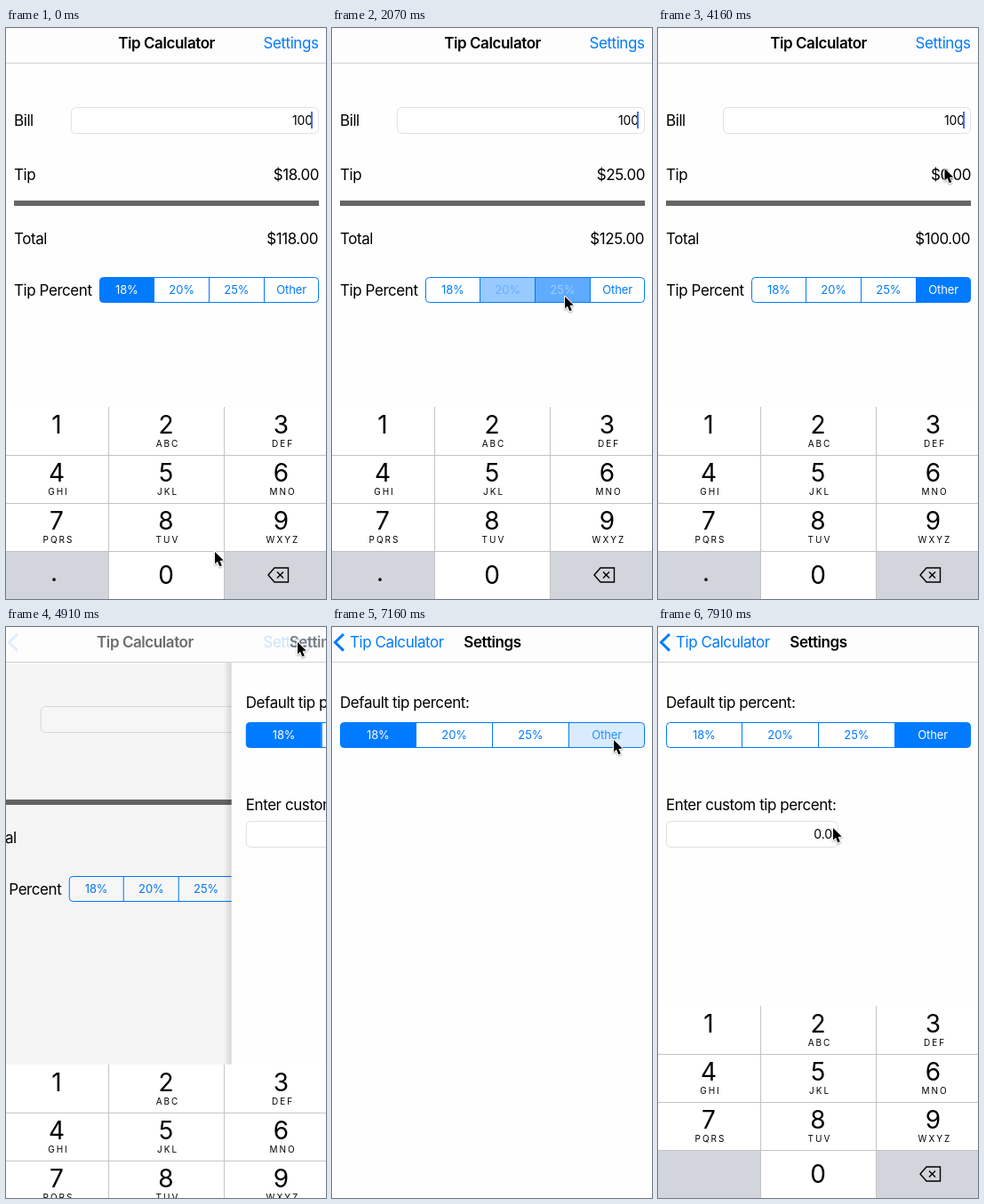
Recreate the animation shown at these times as an HTML page with a canvas. Size 360 px wide and 642 px high, loop 8 s.

```html
<!DOCTYPE html>
<html lang="en">
<head>
<meta charset="utf-8">
<title>Tip Calculator</title>
<style>
html, body { margin: 0; width: 100%; height: 100%; overflow: hidden; background: #fefefe; }
canvas { display: block; width: 360px; height: 642px; }
</style>
</head>
<body>
<canvas id="stage"></canvas>
<script>
const W = 360, H = 642, LOOP = 8000, TICK = 149.25;
const BLUE = '#007aff', PAPER = '#fefefe';
const canvas = document.getElementById('stage');
const ctx = canvas.getContext('2d');
const dpr = window.devicePixelRatio || 1;
canvas.width = W * dpr;
canvas.height = H * dpr;

// Pointer stops: tick, x, y
const STOPS = [
  [0, 235, 589], [7, 213, 302], [10, 213, 302], [13, 262, 302], [16, 262, 302],
  [18, 317, 299], [25, 317, 299], [31, 328, 17], [38, 328, 17], [39, 316, 151],
  [41, 317, 164], [44, 317, 127], [49, 317, 127], [53, 197, 226]
];
// Segment choices: tick pressed, tick of the cross-fade, chosen index
const BILL_PICKS = [[8, 9, 1], [13, 14, 2], [18, 20, 3]];
const DEFAULT_PICKS = [[48, 49, 3]];
const PUSH = 33, REVEAL = 49;

const clamp = v => Math.max(0, Math.min(1, v));

// Critically damped spring, sampled from the given start tick
function spring(n, start) {
  if (n < start) return 0;
  const x = 1.11 + 2.7 * (n - start);
  return 1 - Math.exp(-x) * (1 + x);
}

function pointerAt(n) {
  const i = STOPS.findIndex(s => s[0] > n);
  if (i < 0) return STOPS[STOPS.length - 1].slice(1);
  const [n0, x0, y0] = STOPS[i - 1], [n1, x1, y1] = STOPS[i];
  const u = (n - n0) / (n1 - n0), e = u * u * (3 - 2 * u);
  return [x0 + (x1 - x0) * e, y0 + (y1 - y0) * e];
}

// Amount of blue in each of the four segments
function levels(n, picks) {
  let a = [1, 0, 0, 0], current = 0;
  for (const [press, swap, to] of picks) {
    if (n > swap) {
      a = [0, 0, 0, 0];
      a[to] = 1;
      current = to;
    } else if (n === swap) {
      a[current] = 0.4;
      a[to] = 0.63;
    } else if (n >= press) {
      a[to] = 0.15;
    }
  }
  return a;
}

function caretAlpha(n) {
  const period = 1100, u = (n * TICK - 3650) / period;
  const gap = Math.abs(u - Math.round(u)) * period;
  return clamp((gap - 120) / 120);
}

function text(str, x, y, o = {}) {
  const { size = 17, weight = 400, align = 'left', color = '#000', alpha = 1 } = o;
  const gap = o.gap ?? (size === 17 ? -0.43 : -0.1);
  ctx.font = `${weight} ${size}px Inter, "Open Sans", sans-serif`;
  ctx.letterSpacing = gap + 'px';
  ctx.textAlign = align;
  ctx.fillStyle = color;
  ctx.globalAlpha = alpha;
  ctx.fillText(str, x, y);
  ctx.globalAlpha = 1;
}

function rect(x, y, w, h, color) {
  ctx.fillStyle = color;
  ctx.fillRect(x, y, w, h);
}

function line(points, color, width) {
  ctx.beginPath();
  points.forEach(p => ctx.lineTo(...p));
  ctx.strokeStyle = color;
  ctx.lineWidth = width;
  ctx.stroke();
}

function roundBox(x, y, w, h, r) {
  ctx.beginPath();
  ctx.roundRect(x + 0.5, y + 0.5, w - 1, h - 1, r);
}

function field(x, y, w, value) {
  roundBox(x, y, w, 30, 5);
  ctx.fillStyle = '#fff';
  ctx.fill();
  ctx.strokeStyle = '#e0e0e0';
  ctx.lineWidth = 1;
  ctx.stroke();
  text(value, x + w - 7, y + 19.5, { size: 14, align: 'right' });
}

function segments(x, y, w, amounts) {
  const h = 29, part = w / 4;
  ctx.save();
  roundBox(x, y, w, h, 4);
  ctx.clip();
  rect(x, y, w, h, '#fff');
  ['18%', '20%', '25%', 'Other'].forEach((label, i) => {
    const a = amounts[i], left = Math.floor(x + part * i);
    ctx.globalAlpha = a;
    rect(left, y, Math.floor(x + part * (i + 1)) - left, h, BLUE);
    ctx.globalAlpha = 1;
    if (i) rect(left, y, 1, h, BLUE);
    text(label, x + part * (i + 0.5), y + 19, {
      size: 13, align: 'center', color: `rgb(${255 * a},${122 + 133 * a},255)`
    });
  });
  ctx.restore();
  roundBox(x, y, w, h, 4);
  ctx.strokeStyle = BLUE;
  ctx.lineWidth = 1;
  ctx.stroke();
}

function billPage(n) {
  const tip = n < 9 ? 18 : n < 14 ? 20 : n < 19 ? 25 : 0;
  const money = v => '$' + v.toFixed(2);
  rect(-7, 0, 375, H, PAPER);
  text('Bill', 9, 110);
  field(73, 89, 279, '100');
  ctx.globalAlpha = caretAlpha(n);
  rect(343, 94, 2, 19, '#426bf2');
  ctx.globalAlpha = 1;
  text('Tip', 9, 171);
  text(money(tip), 352, 171, { align: 'right' });
  rect(9, 194, 343, 6, '#666');
  text('Total', 9, 243);
  text(money(100 + tip), 351, 243, { align: 'right' });
  text('Tip Percent', 9, 300.5);
  segments(105, 280, 247, levels(n, BILL_PICKS));
}

function settingsPage(n) {
  rect(-7, 0, 375, H, PAPER);
  text('Default tip percent:', 9, 91);
  segments(9, 107, 343, levels(n, DEFAULT_PICKS));
  if (n < PUSH + 3 || n >= REVEAL) {
    text('Enter custom tip percent:', 9, 205.5);
    field(9, 218, 194, '0.0');
  }
}

function pages(n, p) {
  ctx.save();
  ctx.translate(-112.5 * p, 0);
  billPage(n);
  ctx.restore();
  if (!p) return;
  const x = 375 * (1 - p);
  rect(0, 0, W, H, `rgba(0,0,0,${0.12 * p})`);
  const shade = ctx.createLinearGradient(x - 16, 0, x - 7, 0);
  shade.addColorStop(0, 'rgba(0,0,0,0)');
  shade.addColorStop(1, `rgba(0,0,0,${0.2 * (1 - p)})`);
  rect(x - 16, 0, 9, H, shade);
  ctx.save();
  ctx.translate(x, 0);
  settingsPage(n);
  ctx.restore();
}

function navBar(n, p) {
  rect(0, 0, W, 39, '#fdfdfd');
  rect(0, 39, W, 1, '#d2d2d2');
  const bold = { weight: 600, align: 'center' };
  text('Tip Calculator', 180.5 - 79 * p, 23, { ...bold, alpha: clamp(1 - 1.4 * p) });
  const dim = n === PUSH - 1 ? 0.3 : 1;
  text('Settings', 351.5, 23, {
    align: 'right', color: BLUE, alpha: p ? clamp(0.35 - 0.5 * p) : dim
  });
  if (!p) return;
  text('Settings', 180.5 + 245 * (1 - p), 23, { ...bold, alpha: clamp(1.6 * p) });
  const back = clamp((p - 0.4) / 0.6);
  text('Tip Calculator', 20 + 79 * (1 - p), 23, { color: BLUE, alpha: back });
  ctx.globalAlpha = Math.max(back, 0.12);
  line([[13, 8], [3.5, 17.3], [13, 26.6]], BLUE, 3);
  ctx.globalAlpha = 1;
}

function keyboard(drop, point) {
  if (drop > 215.5) return;
  ctx.save();
  ctx.translate(0, 426 + drop);
  rect(0, 0, W, 216, '#fff');
  rect(0, 162, 115, 54, '#d2d5db');
  rect(246, 162, 114, 54, '#d2d5db');
  for (let row = 1; row < 4; row++) rect(0, row * 54, W, 1, '#c3c3c5');
  rect(115, 0, 1, 216, '#c3c3c5');
  rect(245, 0, 1, 216, '#c3c3c5');
  const digit = { size: 28, align: 'center', gap: 0 };
  const mids = [57, 180, 309.5];
  ['', 'ABC', 'DEF', 'GHI', 'JKL', 'MNO', 'PQRS', 'TUV', 'WXYZ'].forEach((letters, i) => {
    const x = mids[i % 3], y = Math.floor(i / 3) * 54;
    text(String(i + 1), x, y + 30, digit);
    text(letters, x + 2, y + 45, { size: 10, align: 'center', gap: 2 });
  });
  text('0', 180, 199, digit);
  if (point) text('.', 54, 196, digit);
  line([[295, 189], [302, 181], [317.5, 181], [317.5, 197], [302, 197], [295, 189], [302, 181]], '#000', 1.4);
  line([[305, 185.5], [312, 192.5]], '#000', 1.4);
  line([[312, 185.5], [305, 192.5]], '#000', 1.4);
  ctx.restore();
}

function pointer(x, y) {
  ctx.save();
  ctx.translate(x, y);
  ctx.beginPath();
  [[0, 0], [0, 13.5], [3, 10.8], [5.3, 16.2], [7.8, 15.2], [5.5, 9.9], [9.6, 9.6]]
    .forEach(p => ctx.lineTo(...p));
  ctx.closePath();
  ctx.lineJoin = 'round';
  ctx.shadowColor = 'rgba(0,0,0,.35)';
  ctx.shadowBlur = 2 * dpr;
  ctx.shadowOffsetY = dpr;
  ctx.strokeStyle = '#fff';
  ctx.lineWidth = 2;
  ctx.stroke();
  ctx.shadowColor = 'transparent';
  ctx.fillStyle = '#000';
  ctx.fill();
  ctx.restore();
}

function draw(ms) {
  const n = Math.floor((ms % LOOP + 20) / TICK);
  const p = n >= PUSH + 3 ? 1 : spring(n, PUSH);
  ctx.setTransform(dpr, 0, 0, dpr, 0, 0);
  pages(n, p);
  navBar(n, p);
  keyboard(216 * (n < REVEAL ? p : 1 - spring(n, REVEAL)), n < REVEAL);
  pointer(...pointerAt(n));
}

const begin = performance.now();
function loop() {
  draw(performance.now() - begin);
  requestAnimationFrame(loop);
}
loop();
</script>
</body>
</html>
```
